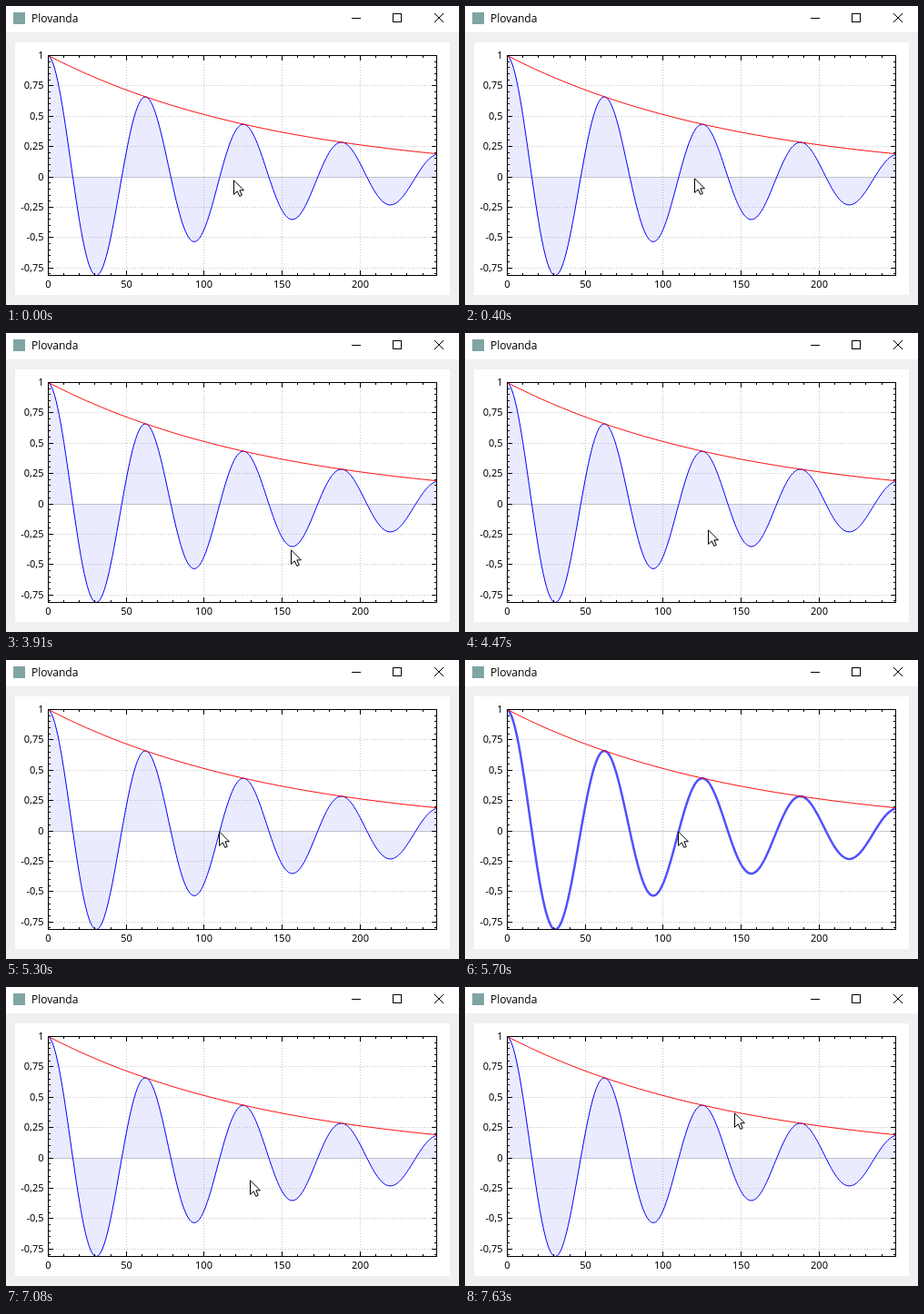
These frames come from a looping animation (498x329 px, 8 s). An HTML page:

```html
<!DOCTYPE html>
<html lang="en">
<head>
<meta charset="utf-8">
<title>Damped oscillation</title>
<style>
  html, body { margin: 0; width: 100%; height: 100%; overflow: hidden; background: #f0f0f0; }
  svg { display: block; }
  .title { font: 12px "Open Sans", "Noto Sans", sans-serif; }
  .labels { font: 11px "Noto Sans", "Open Sans", sans-serif; }
  .crisp { shape-rendering: crispEdges; }
  .line { fill: none; stroke: #000; }
  .grid { stroke: #c8c8c8; }
  #wave { animation: select 8s step-end infinite; }
  #area { animation: hide 8s step-end infinite; }
  #cursor { animation: move 8s step-end infinite; }

  @keyframes select {
    0%, 88.5%, 100% { stroke: #00f; stroke-width: 1px; }
    71.25% { stroke: #5050ff; stroke-width: 2.5px; }
  }
  @keyframes hide {
    0%, 88.5%, 100% { visibility: visible; }
    71.25% { visibility: hidden; }
  }
  @keyframes move {
    0% { transform: translate(250px, 191px); }
    1.625% { transform: translate(251px, 190px); }
    5% { transform: translate(252px, 189px); }
    40.25% { transform: translate(279px, 200px); }
    41.875% { transform: translate(299px, 215px); }
    43.75% { transform: translate(322px, 232px); }
    45.375% { transform: translate(337px, 243px); }
    48.875% { transform: translate(313px, 238px); }
    50.5% { transform: translate(287px, 228px); }
    52.375% { transform: translate(279px, 225px); }
    54% { transform: translate(271px, 221px); }
    55.875% { transform: translate(267px, 216px); }
    57.625% { transform: translate(261px, 206px); }
    59.25% { transform: translate(254px, 195px); }
    61% { transform: translate(248px, 190px); }
    62.625% { transform: translate(242px, 185px); }
    64.5% { transform: translate(237px, 187px); }
    66.25% { transform: translate(234px, 188px); }
    78.375% { transform: translate(251px, 200px); }
    80% { transform: translate(266px, 211px); }
    81.875% { transform: translate(268px, 212px); }
    90.125% { transform: translate(279px, 180px); }
    91.75% { transform: translate(289px, 149px); }
    93.5% { transform: translate(294px, 142px); }
    95.375%, 100% { transform: translate(296px, 138px); }
  }
</style>
</head>
<body>
<svg width="498" height="329" viewBox="0 0 498 329">
  <clipPath id="inside"><rect x="47" y="55" width="426" height="241"/></clipPath>
  <rect width="498" height="329" fill="#f0f0f0"/>
  <rect width="498" height="29" fill="#fff"/>
  <rect x="8" y="7" width="13" height="13" fill="#7fa5a3"/>
  <text class="title" x="28" y="18">Plovanda</text>
  <path class="line crisp" d="M380 13.5H390M425.5 8.5H434.5V17.5H425.5Z"/>
  <path class="line" d="M471 8L481 18M481 8L471 18"/>

  <rect x="10" y="40" width="478" height="278" fill="#fff"/>
  <path id="grid" class="line grid crisp" stroke-dasharray="1 2"/>
  <path id="zero" class="line grid crisp"/>
  <g clip-path="url(#inside)">
    <path id="area" fill="#00f" fill-opacity=".08"/>
    <path id="wave" class="line"/>
    <path id="envelope" fill="none" stroke="#f00"/>
  </g>
  <path id="axes" class="line crisp"/>
  <g id="labels" class="labels"></g>

  <path id="cursor" d="M.5 .8V16.4L4.3 12.8L6.8 18.4L9.3 17.3L6.9 11.8H11.4Z" fill="#fff" stroke="#000"/>
</svg>
<script>
  const LEFT = 46, TOP = 54, RIGHT = 473, BOTTOM = 296, LAST = 249;
  const $ = id => document.getElementById(id);
  const decay = i => Math.exp(-i / 150);
  const swing = i => decay(i) * Math.cos(i / 10);
  const low = swing(31);

  const px = v => LEFT + v / LAST * (RIGHT - LEFT);
  const py = v => TOP + (1 - v) / (1 - low) * (BOTTOM - TOP);
  const snap = p => Math.round(p) + .5;

  const plot = f => 'M' + Array.from({ length: LAST + 1 }, (_, i) =>
    `${(px(i) + .5).toFixed(2)} ${(py(f(i)) + .5).toFixed(2)}`).join('L');

  function label(text, x, y, anchor) {
    const el = document.createElementNS('http://www.w3.org/2000/svg', 'text');
    el.setAttribute('x', x);
    el.setAttribute('y', y);
    el.setAttribute('text-anchor', anchor);
    el.textContent = text;
    $('labels').append(el);
  }

  let grid = '';
  let axes = `M${LEFT + .5} ${TOP + .5}H${RIGHT + .5}V${BOTTOM + .5}H${LEFT + .5}Z`;

  // Ticks point inwards on all four sides; every fifth is a major one.
  for (let k = 0; k * 10 <= LAST; k++) {
    const x = snap(px(k * 10)), major = k % 5 === 0, len = major ? 6 : 3;
    axes += `M${x} ${TOP}v${len}M${x} ${BOTTOM + 1}v${-len}`;
    if (major) {
      if (k) grid += `M${x} ${BOTTOM}V${TOP}`;
      label(k * 10, x, 310, 'middle');
    }
  }
  for (let k = 20; k / 20 >= low; k--) {
    const y = snap(py(k / 20)), major = k % 5 === 0, len = major ? 6 : 3;
    axes += `M${LEFT} ${y}h${len}M${RIGHT + 1} ${y}h${-len}`;
    if (major) {
      if (k && k < 20) grid += `M${LEFT} ${y}H${RIGHT}`;
      label(String(k / 20).replace('.', ','), 41.5, y + 3.5, 'end');
    }
  }

  const base = snap(py(0)), wave = plot(swing);
  $('grid').setAttribute('d', grid);
  $('axes').setAttribute('d', axes);
  $('zero').setAttribute('d', `M${LEFT} ${base}H${RIGHT}`);
  $('wave').setAttribute('d', wave);
  $('area').setAttribute('d', `${wave}V${base}H${LEFT + .5}Z`);
  $('envelope').setAttribute('d', plot(decay));
</script>
</body>
</html>
```
